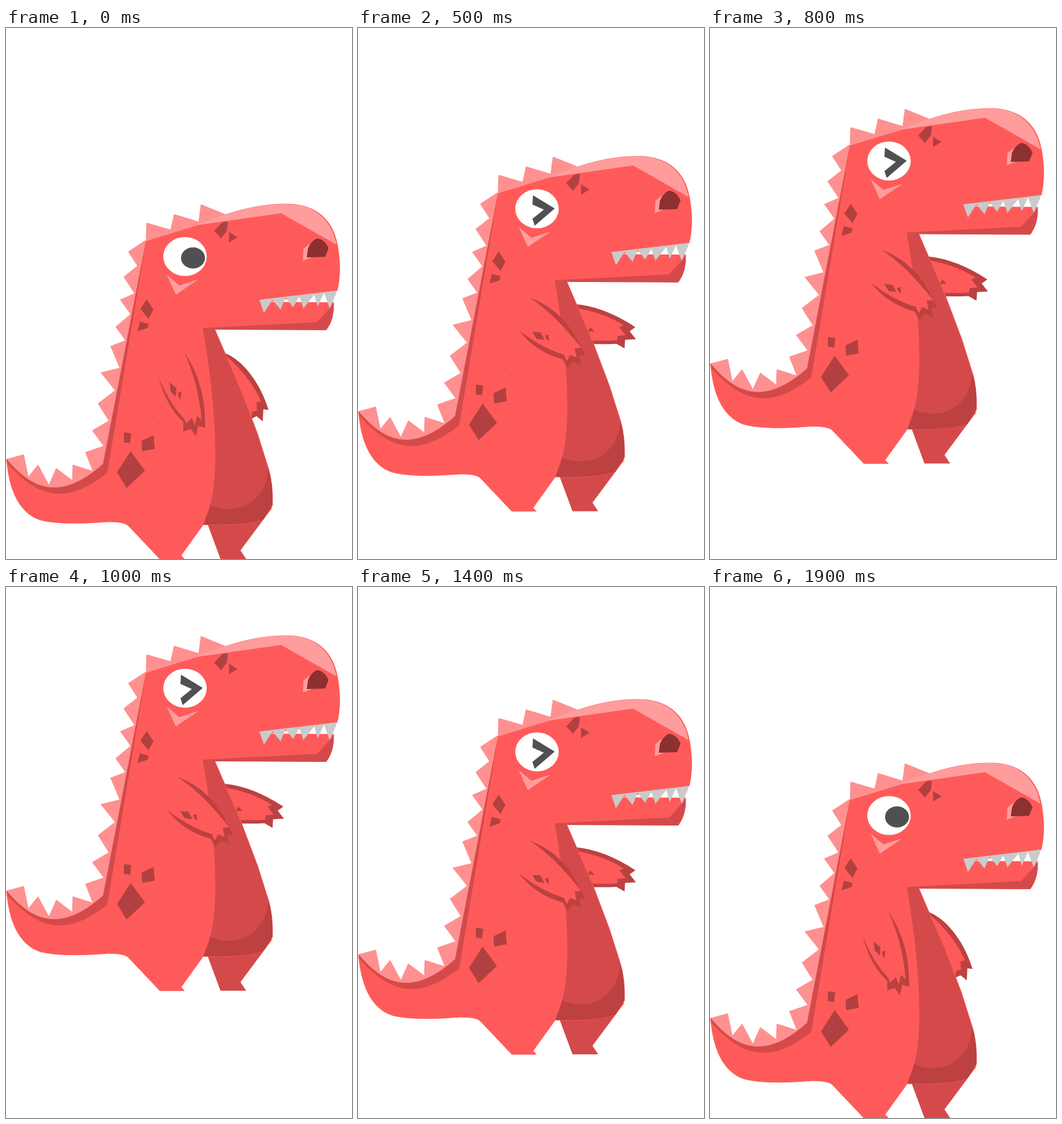
Write an HTML page that moves like this. It is 605 px wide and 926 px high and loops after 2.1 s.

```html
<!DOCTYPE html>
<html lang="en">
<head>
<meta charset="utf-8">
<title>Jumping dinosaur</title>
<style>
  html, body { margin: 0; width: 100%; height: 100%; overflow: hidden; background: #fff; }
  svg { display: block; width: 605px; height: 926px; }
  .red { fill: #ff5a5a; }
  .shade { fill: #d44a4a; }
  .dark { fill: #bd4141; }
  .spot { fill: #b34040; }
  .spike { fill: #ff9090; stroke: #ff9090; }
  .light { fill: #ff9d9d; }
  .ink { fill: #505050; }
  .skin { stroke: #ff5a5a; }
</style>
</head>
<body>
<svg viewBox="0 0 605 926">
  <g id="dino">
    <!-- far arm -->
    <g class="rest">
      <path class="dark" d="M365 560L383 567C416 580 446 622 459 666L450 665 449 686 438 677 428 682Z"/>
      <path class="red" d="M365 562L384 571Q426 607 446 651L438 653 439 667 430 670 429 682Z"/>
    </g>
    <g class="jump">
      <path class="dark" d="M370 563L382 565Q432 570 485 605L475 612 486 626 467 627 466 642 452 634Q430 635 400 634Z"/>
      <path class="red" d="M370 572L384 572Q430 580 465 602L457 605 468 619 454 620 453 628Q430 629 400 628Z"/>
      <path class="spot" d="M400 616L406 605 414 613 407 612Z"/>
    </g>

    <!-- body and legs -->
    <path class="shade" d="M352 864L375 926H420L410 911 466 836Z"/>
    <path class="spike" d="M1 752L31 744 39 783 56 762 75 797 88 768 116 789 117 762 152 773 139 740 171 729 151 702 180 685 161 655 191 632 166 601 199 593 183 555 209 545 192 521 218 499 200 474 225 463 206 434 230 415 214 390 243 371 247 371 174 765C90 832 40 798 2 757Z"/>
    <path class="red skin" d="M245 371L330 345C383 325 430 307 490 307C533 307 569 326 579 376C585 405 585 435 579 458L455 478 573 479Q574 508 560 526L365 525 400 866H345L306 920 312 926H269L213 867Q205 861 180 861C160 862 100 868 60 858C20 845 5 800 1 752C40 798 90 832 170 760Z"/>
    <path class="shade" d="M245 371L170 760C90 832 40 798 1 752L3 760C60 824 110 829 177 776Z"/>
    <path class="shade skin" d="M365 525L384 569 412 634 440 708 459 768Q467 795 466 832L450 857Q420 868 346 866Z"/>
    <path class="red" d="M340 523H344Q366 650 366 740Q366 800 357 832Q350 850 345 866H320Z"/>
    <path class="shade" d="M344 523L365 525 390 600 366 740Q366 650 344 523Z"/>
    <path class="dark" d="M459 768Q467 795 466 832L450 857Q420 868 345 866Q353 850 357 832Q372 839 390 839C430 838 455 810 459 768Z"/>

    <!-- head -->
    <path class="spike" d="M245 371L246 340 288 352 294 325 337 338 341 308 383 325 330 345Z"/>
    <path class="light" d="M326 345L330 344C383 325 430 307 490 307C520 307 566 318 578 378L481 323Z"/>
    <path class="shade" d="M345 523L544 513 573 481Q574 508 560 527L365 526Z"/>
    <path fill="#cacaca" d="M443 474L578 458 577 464 566 489 556 462 545 486 539 465 520 489 513 468 502 487 489 470 480 491 466 474 451 497Z"/>
    <path class="light" d="M520 385L531 376 527 399 535 400 519 406Z"/>
    <path fill="#8c3030" d="M526 400L528 384Q537 367 546 367Q558 370 564 384L558 399Z"/>
    <path class="light" d="M281 430L303 449 337 438 297 465Z"/>
    <ellipse cx="313" cy="398.5" rx="38" ry="34" fill="#fff"/>
    <ellipse class="ink rest" cx="327" cy="401" rx="21" ry="18.5"/>
    <path class="ink jump" d="M306 375L344 398 309 428 305 416 325 400 305 391Z"/>

    <path class="spot" d="M364 354L377 340Q386 335 388 340L386 354 376 367ZM390 356L405 365 390 374Z
      M246 473L258 491 249 507 235 490ZM234 512L249 516 248 523 230 529Z
      M206 705L219 707 217 724 206 722ZM237 720L258 710 260 734 238 738Z
      M218 738L243 772 211 802 194 775ZM266 688h1.5v1.5h-1.5Z"/>

    <!-- near arm -->
    <g class="rest">
      <path class="dark" d="M311 565C335 598 350 645 348 697L336 694 332 712 323 699 310 704 310 687 306 683Q278 655 266 605Z"/>
      <path class="red" d="M311 564Q337 620 342 684L334 676 330 693 325 680 315 690 312 682Q285 655 265 604Z"/>
      <path class="spot" d="M286 618L298 628 297 643 288 634ZM301 636L307 634 305 647 302 644Z"/>
    </g>
    <g class="jump">
      <path class="dark" d="M302 554Q362 577 389 639L398 654 387 655 390 671 376 664 366 676 358 661Q310 648 282 611Z"/>
      <path class="red" d="M301 554Q345 583 390 641L379 642 382 658 371 653 365 664 360 653Q318 640 281 610Z"/>
      <path class="spot" d="M305 613L319 614 326 627 312 625ZM327 620L333 618 334 628 331 628Z"/>
    </g>
  </g>
</svg>
<script>
  const LOOP = 2100, STEP = 100, RISE = 27.75;
  const dino = document.getElementById('dino');
  const show = (name, on) => dino.querySelectorAll('.' + name)
    .forEach(el => el.style.display = on ? '' : 'none');

  function draw() {
    const step = Math.floor(performance.now() % LOOP / STEP);
    const jumping = step >= 1 && step < 19;
    // climbs for eight steps, peaks at step 10, falls the same way
    const y = -RISE * Math.max(0, 8 - Math.abs(step - 10));
    dino.setAttribute('transform', `translate(0 ${y})`);
    show('rest', !jumping);
    show('jump', jumping);
    requestAnimationFrame(draw);
  }
  draw();
</script>
</body>
</html>
```
